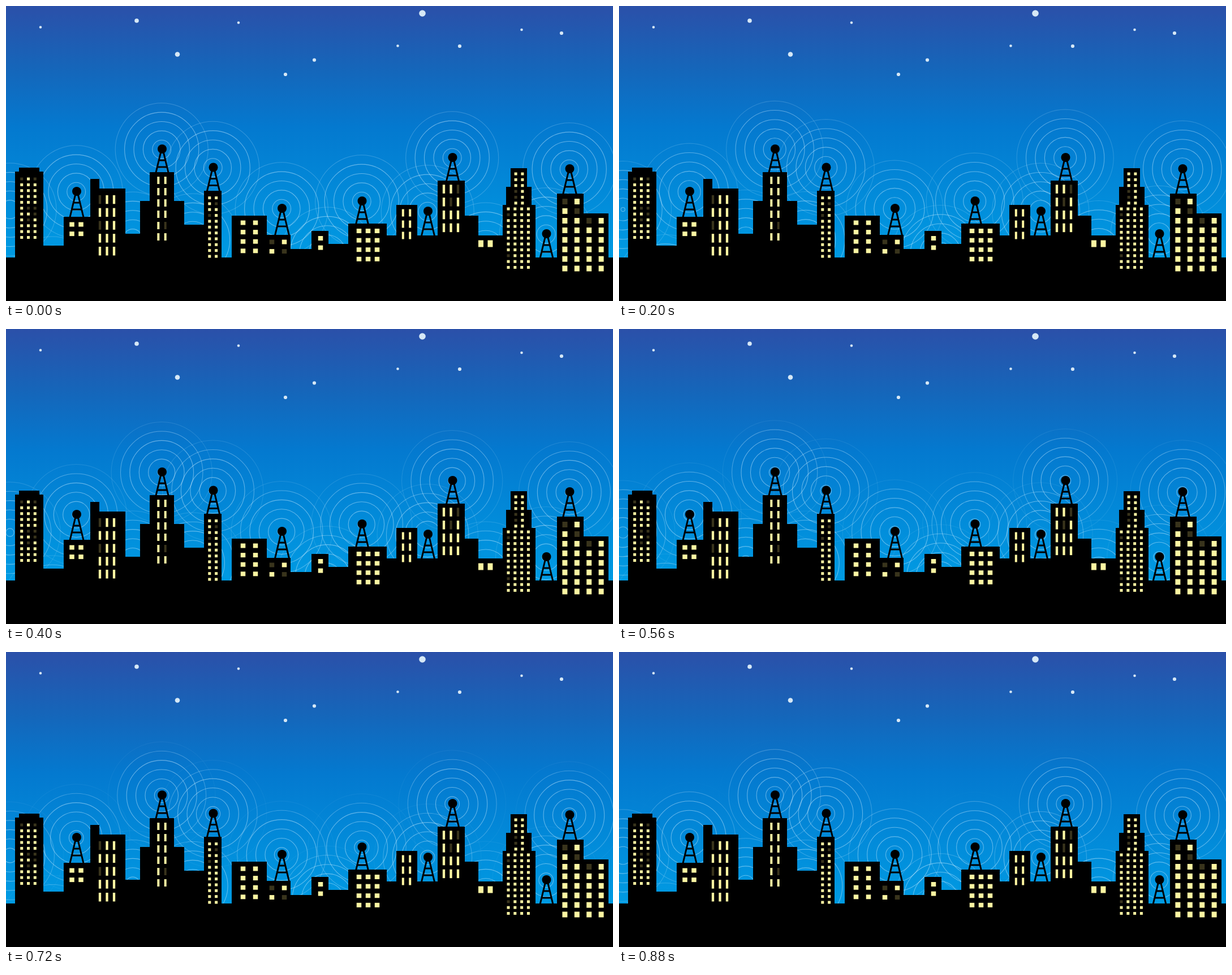
An HTML page with a canvas that plays this animation: 1073x522 px, repeating every 0.92 s.

```html
<!DOCTYPE html>
<html lang="en">
<head>
<meta charset="utf-8">
<title>City signals</title>
<style>
  html, body { margin: 0; width: 100%; height: 100%; overflow: hidden; background: #000; }
  canvas { display: block; }
</style>
</head>
<body>
<canvas width="1073" height="522"></canvas>
<script>
const W = 1073, H = 522, GROUND = 445;
const LOOP = 920, STEP = 40;
const SPACING = 16.4, RINGS = 6;
const ctx = document.querySelector('canvas').getContext('2d');

const sky = ctx.createLinearGradient(0, 0, 0, GROUND);
[[0, '#2b50a9'], [.25, '#1566ba'], [.48, '#0479cf'], [1, '#009be3']]
  .forEach(stop => sky.addColorStop(...stop));

const skyline = new Path2D(`M0 522V445H16V293H23V286H59V293H66V424H102V373H149V306H165V323H211
  V403H237V345H254V294H297V345H315V387H350V327H381V445H399V371H461V405H503V430H540V398H570V421
  H605V385H673V406H690V352H727V406H763V309H811V371H835V406H878V352H884V320H892V287H921V320H929
  V352H936V445H974V332H1021V367H1065V445H1073V522Z`);

const masts = [[125, 328], [276, 253], [366.5, 285.5], [488, 358], [629.5, 345],
  [746, 363], [789.5, 268], [955.5, 403], [996.5, 288]];
const behindRoofs = [[7, 360], [82, 490], [224, 411], [330, 414], [568, 438], [848, 430]];
const sources = [...masts.map(([x, y]) => [x - .8, y + .7]), ...behindRoofs];

// Window styles: size and column/row pitch
const dot = { w: 5, h: 5, dx: 11.8, dy: 10.35 };
const slit = { w: 4, h: 13, dx: 12.4, dy: 20 };
const tallSlit = { w: 4.3, h: 15.5, dx: 12.5, dy: 22.8 };
const pane = { w: 8.5, h: 8, dx: 22, dy: 16.6 };
const closePane = { ...pane, dx: 16 };
const bigPane = { w: 9, h: 10, dx: 21.4, dy: 16.9 };
const pairPane = { ...bigPane, h: 12, dx: 16.5 };

function seededRandom(seed) {
  return () => (seed = seed * 16807 % 2147483647) / 2147483647;
}

function disc(x, y, r) {
  ctx.beginPath();
  ctx.arc(x, y, r, 0, 2 * Math.PI);
  ctx.fill();
}

function drawStars() {
  ctx.fillStyle = '#d6e8f6';
  const small = [[61, 37.5], [411, 29.5], [692.5, 70.5], [911.5, 42]];
  const medium = [[494, 121], [545, 95.5], [802, 71], [982, 48]];
  small.forEach(([x, y]) => disc(x, y, 2.3));
  medium.forEach(([x, y]) => disc(x, y, 3.1));
  disc(231, 26, 3.8);
  disc(303, 85.5, 4.3);
  disc(736, 13, 5.8);
}

function drawRings(phase) {
  ctx.lineWidth = 1.1;
  for (let k = 0; k < RINGS; k++) {
    const r = SPACING * (k + phase);
    const alpha = .47 * Math.min(1, 2 * (1 - r / (SPACING * RINGS)) * 1.5);
    ctx.strokeStyle = `rgba(205,235,255,${alpha})`;
    for (const [x, y] of sources) {
      ctx.beginPath();
      ctx.arc(x, y, r, 0, 2 * Math.PI);
      ctx.stroke();
    }
  }
}

// The foot reaches below the roof line; the skyline covers the excess.
function drawMast([x, y]) {
  const halfWidth = drop => 1 + drop * .24;
  ctx.beginPath();
  for (const side of [-1, 1]) {
    ctx.moveTo(x + side * halfWidth(4), y + 4);
    ctx.lineTo(x + side * halfWidth(48), y + 48);
  }
  for (const drop of [20, 32]) {
    ctx.moveTo(x - halfWidth(drop), y + drop);
    ctx.lineTo(x + halfWidth(drop), y + drop);
  }
  ctx.stroke();
  disc(x, y, 8);
}

// Grid of windows centred on x, with its first row centred on y
function facade({ w, h, dx, dy }, x, y, cols, rows, random) {
  const left = x - (cols - 1) * dx / 2;
  for (let row = 0; row < rows; row++) {
    for (let col = 0; col < cols; col++) {
      ctx.fillStyle = random() < .1 ? '#39341c' : '#fdf6a2';
      ctx.fillRect(left + col * dx - w / 2, y + row * dy - h / 2, w, h);
    }
  }
}

function drawWindows() {
  const random = seededRandom(12);
  const add = (...args) => facade(...args, random);
  add(dot, 39.5, 306, 3, 11);
  add(closePane, 124.5, 386.5, 2, 2);
  add(tallSlit, 178.5, 342.5, 3, 5);
  add(slit, 275.5, 308.5, 2, 6);
  add(dot, 365.7, 339.5, 2, 11);
  add(pane, 430, 383.5, 2, 4);
  add(pane, 481, 417.5, 2, 2);
  add(pane, 556, 411, 1, 2);
  add(closePane, 640, 398, 3, 4);
  add(slit, 708, 366, 2, 3);
  add(tallSlit, 786.5, 324, 3, 4);
  add(pairPane, 847.7, 420.5, 2, 1);
  add(dot, 907, 297, 2, 6);
  add(dot, 905.7, 359, 4, 11);
  add(bigPane, 998.7, 346, 2, 2);
  add(bigPane, 1020, 380, 4, 6);
}

function draw(now) {
  const time = Math.floor((now % LOOP) / STEP) * STEP;
  ctx.fillStyle = sky;
  ctx.fillRect(0, 0, W, H);
  drawStars();
  drawRings(time / LOOP);
  ctx.fillStyle = ctx.strokeStyle = '#000';
  ctx.lineWidth = 3;
  masts.forEach(drawMast);
  ctx.fill(skyline);
  drawWindows();
}

const start = performance.now();
function tick() {
  draw(performance.now() - start);
  requestAnimationFrame(tick);
}
tick();
</script>
</body>
</html>
```
